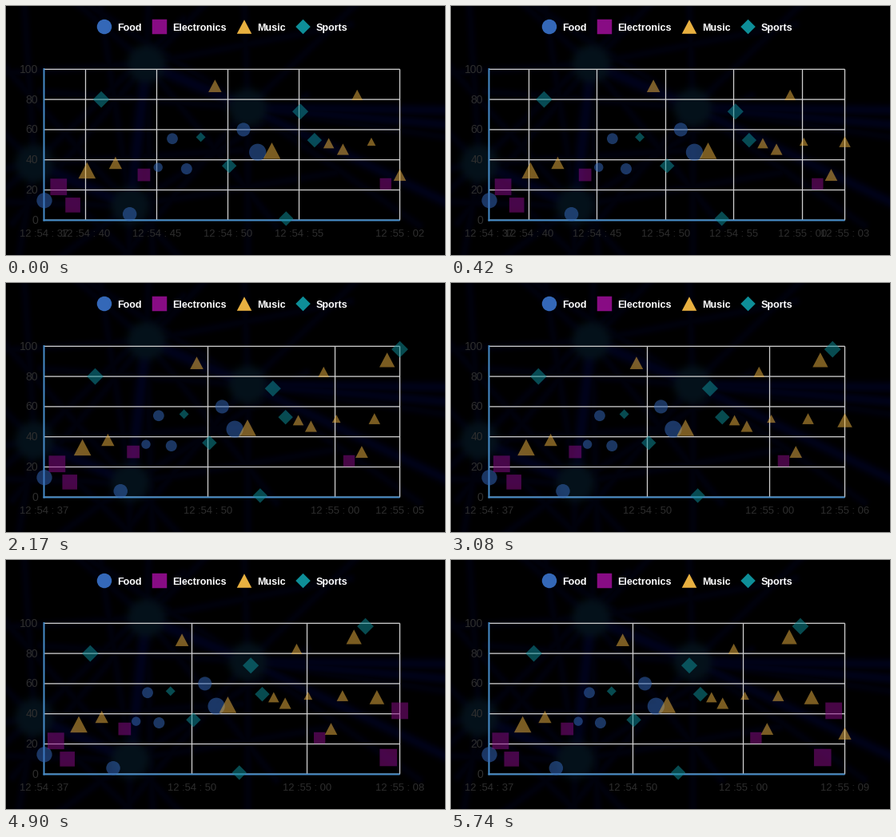
A matplotlib script that plays this animation: 549 px wide and 312 px high, repeating every 6160 ms.

```python
import numpy as np
import matplotlib.pyplot as plt
from matplotlib.animation import FuncAnimation
from matplotlib.patches import Circle, Polygon, Rectangle

W, H, DPI = 549, 312, 100
LEFT, RIGHT, TOP, BOTTOM = 48, 492.5, 79.3, 268.3
PX = 72 / DPI  # points per pixel

COLORS = {"food": "#3468b8", "elec": "#880c84", "music": "#e8b040", "sport": "#0e8e98"}

# One reading per second
KINDS = """food elec elec music sport music food elec food food food
    sport music sport food food music sport sport sport music music
    music music elec music music music sport music elec elec music""".split()
VALUES = [13, 22, 10, 33, 80, 38, 4, 30, 35, 54, 34,
          55, 89, 36, 60, 45, 46, 1, 72, 53, 51, 47,
          83, 52, 24, 30, 52, 91, 98, 51, 11, 42, 27]

FRAMES, INTERVAL = 88, 70
FIRST_SPAN = 25  # seconds shown before the first arrival
START = 37.11  # seconds after 12:54
MIN_GAP = 46.5  # closest a tick may come to either end

fig = plt.figure(figsize=(W / DPI, H / DPI), dpi=DPI, facecolor="black")
ax = fig.add_axes([0, 0, 1, 1])
ax.set_xlim(0, W)
ax.set_ylim(H, 0)
ax.axis("off")


def backdrop():
    """Dark web of soft navy strands with a few teal cell bodies."""
    y, x = np.mgrid[0:H, 0:W].astype(float)
    cells = np.array([(35, 197), (155, 250), (175, 72), (302, 127)])
    glow = np.zeros((H, W))

    def strand(a, b, width, strength):
        (x0, y0), (dx, dy) = a, b - a
        t = np.clip(((x - x0) * dx + (y - y0) * dy) / (dx * dx + dy * dy), 0, 1)
        d2 = (x - x0 - t * dx) ** 2 + (y - y0 - t * dy) ** 2
        glow[:] = np.maximum(glow, strength * np.exp(-d2 / (2 * width ** 2)))

    for a, b in zip(cells, cells[1:]):
        strand(a, b, 6, 0.9)
    rng = np.random.default_rng(4)
    for cell in cells:
        for angle in np.arange(0, 2 * np.pi, np.pi / 4) + rng.normal(0, 0.1, 8):
            reach = 260 * np.array([np.cos(angle), np.sin(angle)])
            strand(cell, cell + reach, 4, 0.4)
    for edge_y in (130, 148, 245):
        strand(cells[3], np.array([W, edge_y]), 5, 0.8)

    img = glow[..., None] * np.array([1, 3, 30])
    for cx, cy in cells:
        d = np.hypot(x - cx, y - cy)
        body = 1 / (1 + np.exp((d - 23) / 3))[..., None]
        img = img * (1 - body) + body * np.array([5, 18, 27])
    return img.astype(np.uint8)


def marker(kind, x, y, size, **style):
    r = size / 2
    style = dict(facecolor=COLORS[kind], linewidth=0, snap=False, **style)
    if kind == "food":
        shape = Circle((x, y), r, **style)
    elif kind == "elec":
        shape = Rectangle((x - r, y - r), size, size, **style)
    elif kind == "music":
        h = r * 0.95
        shape = Polygon([(x, y - h), (x + r, y + h), (x - r, y + h)], **style)
    else:
        shape = Polygon([(x, y - r), (x + r, y), (x, y + r), (x - r, y)], **style)
    return ax.add_patch(shape)


def label(x, y, text, size=13, color="#2e2e2e", ha="center", weight="normal"):
    return ax.text(x, y, text, fontsize=size * PX, color=color, ha=ha,
                   va="center_baseline", weight=weight,
                   family="Liberation Sans", zorder=5)


def line(xs, ys, color="#d0d0d0", width=1.3, z=1):
    return ax.plot(xs, ys, color=color, lw=width * PX, zorder=z,
                   solid_capstyle="butt", snap=False)[0]


def time_label(x, sec):
    minute, second = divmod(int(sec), 60)
    return label(x, 284.8, f"12 :{54 + minute} : {second:02d}")


def y_of(value):
    return BOTTOM - value / 100 * (BOTTOM - TOP)


def size_of(k):
    """Marker sizes swell slowly, with every third one smaller."""
    slow = np.cos(2 * np.pi * (k - 2.5) / 13.5)
    fast = np.cos(2 * np.pi * (k - 0.5) / 3)
    return 16.7 + 4 * slow + 2 * fast


def span_at(frame):
    """Seconds on the axis; a reading arrives about every 12.8 ticks."""
    arrived = sum(frame >= round(5.6 + 12.8 * i) for i in range(7))
    return FIRST_SPAN + arrived


def draw_static():
    ax.imshow(backdrop(), extent=(0, W, H, 0), aspect="auto",
              interpolation="nearest", zorder=0)
    for value in range(0, 101, 20):
        y = y_of(value)
        line([LEFT, RIGHT], [y, y])
        label(40, y - 1, str(value), size=14, ha="right")
    line([RIGHT, RIGHT], [TOP, BOTTOM])
    line([47.5, 47.5], [78, 269.5], "#468cc8", 2, 2)
    line([46.5, RIGHT], [268.5, 268.5], "#468cc8", 2, 2)
    time_label(LEFT, START)

    names = ["Food", "Electronics", "Music", "Sports"]
    for kind, x, name in zip(COLORS, (123, 192, 298, 371.5), names):
        marker(kind, x, 26, 18.5, zorder=4)
        label(x + 16, 26.4, name, 12.5, "white", "left", "bold")


moving = []


def update(frame):
    while moving:
        moving.pop().remove()
    span = span_at(frame)
    scale = (RIGHT - LEFT) / span

    for sec in range(40, 70, 5 if span < 28 else 10):
        x = LEFT + (sec - START) * scale
        if x - LEFT > MIN_GAP and RIGHT - x > MIN_GAP:
            px = int(x) + 0.5
            moving.append(line([px, px], [TOP, BOTTOM]))
            moving.append(time_label(px, sec))
    moving.append(time_label(RIGHT, START + span))

    for k, (kind, value) in enumerate(zip(KINDS[:span + 1], VALUES)):
        moving.append(marker(kind, LEFT + k * scale, y_of(value), size_of(k),
                             alpha=0.53, zorder=3))
    return moving


draw_static()
anim = FuncAnimation(fig, update, frames=FRAMES, interval=INTERVAL,
                     repeat=True, repeat_delay=0, blit=False)
plt.show()
```
